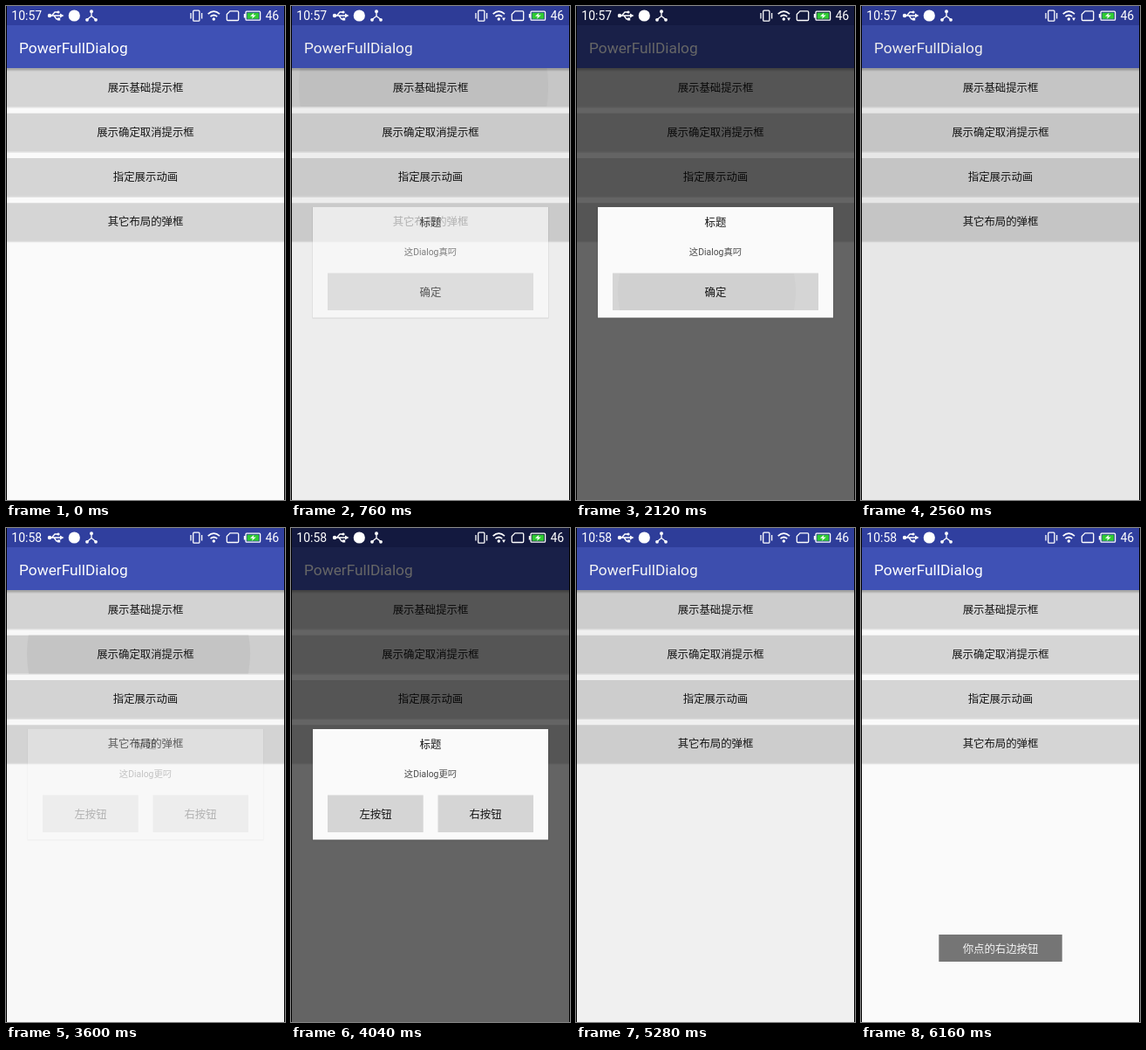
These frames come from a looping animation (320x565 px, 6880 ms). An HTML page:

```html
<!DOCTYPE html>
<html lang="zh-CN">
<head>
<meta charset="utf-8">
<title>PowerFullDialog</title>
<style>
html, body { margin: 0; width: 100%; height: 100%; overflow: hidden; background: #fafafa; }
body > svg { display: block; width: 100vw; height: 100vh; }
text { font: 12.4px Roboto, "Noto Sans CJK SC", "Noto Sans CJK", sans-serif; text-anchor: middle; fill: #161616; }
text.left { text-anchor: start; }
text.status { font-size: 14px; fill: #fff; }
text.title { font-size: 17.3px; fill: #fff; }
text.msg { font-size: 10.4px; fill: #4c4c4c; }
.btn { fill: #d5d5d5; }
.anim { animation: 6880ms linear infinite; --out: cubic-bezier(.333, .667, .667, 1); }
.dim { animation-name: dim; }
.one { animation-name: one; }
.two { animation-name: two; }
.press { animation-name: press; }
.ripple { animation-name: ripple; transform-box: fill-box; transform-origin: center; }
.first { animation-delay: -2920ms; }
.tap { animation-name: tap; }
.toast { animation-name: toast; }
.before { animation-name: before; }
.after { animation-name: after; }
.traffic { animation-name: traffic; }

@keyframes dim {
  0% { opacity: 0; }
  10.47% { opacity: 0; animation-timing-function: var(--out); }
  16.86%, 33.71% { opacity: .6; }
  33.72% { opacity: .5; animation-timing-function: var(--out); }
  40.1%, 52.2% { opacity: 0; }
  52.21% { opacity: 0; animation-timing-function: var(--out); }
  58.72%, 72.66% { opacity: .6; }
  72.67% { opacity: .51; animation-timing-function: var(--out); }
  78.8%, 100% { opacity: 0; }
}
@keyframes one {
  0% { opacity: 0; }
  9.88% { opacity: 0; animation-timing-function: var(--out); }
  12.79%, 33.71% { opacity: 1; }
  33.72% { opacity: .52; animation-timing-function: var(--out); }
  35.4%, 100% { opacity: 0; }
}
@keyframes two {
  0% { opacity: 0; }
  51.74% { opacity: 0; animation-timing-function: var(--out); }
  54.65%, 72.66% { opacity: 1; }
  72.67% { opacity: .52; animation-timing-function: var(--out); }
  74.3%, 100% { opacity: 0; }
}
@keyframes press {
  0%, 46.5% { opacity: 0; }
  48%, 52.4% { opacity: .025; }
  56.4%, 100% { opacity: 0; }
}
@keyframes ripple {
  0%, 46.5% { opacity: 0; transform: scale(.15); }
  48% { opacity: .05; transform: scale(.45); }
  52.4% { opacity: .05; transform: scale(1); }
  56.4%, 100% { opacity: 0; transform: scale(1.4); }
}
@keyframes tap {
  0%, 30.8% { opacity: 0; }
  30.81%, 100% { opacity: .025; }
}
@keyframes toast {
  0% { opacity: 0; }
  79.65% { opacity: 0; animation-timing-function: var(--out); }
  87.21%, 100% { opacity: 1; }
}
@keyframes before {
  0%, 46.5% { opacity: 1; }
  46.51%, 100% { opacity: 0; }
}
@keyframes after {
  0%, 46.5% { opacity: 0; }
  46.51%, 100% { opacity: 1; }
}
@keyframes traffic {
  0%, 10.4% { opacity: 0; }
  10.41%, 46.5% { opacity: 1; }
  46.51%, 56.9% { opacity: 0; }
  56.91%, 68.01% { opacity: 1; }
  68.02%, 100% { opacity: 0; }
}
</style>
</head>
<body>
<svg viewBox="0 0 320 565" preserveAspectRatio="none">
  <defs>
    <linearGradient id="shade" x2="0" y2="1">
      <stop stop-opacity=".32"/>
      <stop offset="1" stop-opacity="0"/>
    </linearGradient>
    <g id="row">
      <rect y="1" width="320" height="44" opacity=".1"/>
      <rect class="btn" width="320" height="43.5"/>
    </g>
    <g id="panel">
      <rect x="24.5" y="230" width="271" height="127.5" opacity=".15"/>
      <rect x="25" y="230" width="270" height="126.5" fill="#fafafa"/>
      <text x="160" y="252.2">标题</text>
    </g>
  </defs>

  <rect width="320" height="565" fill="#fafafa"/>
  <use href="#row" y="71.5"/>
  <use href="#row" y="122.7"/>
  <use href="#row" y="174"/>
  <use href="#row" y="225.3"/>
  <svg y="71.5" width="320" height="43.5">
    <rect class="anim press first" width="320" height="44"/>
    <circle class="anim ripple first" cx="152" cy="21" r="129"/>
  </svg>
  <svg y="122.7" width="320" height="43.5">
    <rect class="anim press" width="320" height="44"/>
    <circle class="anim ripple" cx="152" cy="21" r="129"/>
  </svg>
  <text x="160" y="97.7">展示基础提示框</text>
  <text x="160" y="148.9">展示确定取消提示框</text>
  <text x="160" y="200.2">指定展示动画</text>
  <text x="160" y="251.4">其它布局的弹框</text>

  <rect y="71" width="320" height="4" fill="url(#shade)"/>
  <rect width="320" height="71" fill="#3f51b5"/>
  <rect width="320" height="22" fill="#303f9f"/>
  <text class="left title" x="15" y="53.5">PowerFullDialog</text>

  <rect class="anim dim" width="320" height="565"/>
  <path d="M.5 0V565M319.5 0V565" stroke="#000"/>

  <g class="anim one">
    <use href="#panel"/>
    <text class="msg" x="160" y="285">这Dialog真叼</text>
    <rect class="btn" x="42" y="305.5" width="236" height="42.5"/>
    <svg x="42" y="305.5" width="236" height="42.5">
      <circle class="anim tap" cx="108" cy="21" r="102"/>
    </svg>
    <text x="160" y="331.5">确定</text>
  </g>
  <g class="anim two">
    <use href="#panel"/>
    <text class="msg" x="160" y="285">这Dialog更叼</text>
    <rect class="btn" x="42" y="305.5" width="109.7" height="42.5"/>
    <rect class="btn" x="168.5" y="305.5" width="109.5" height="42.5"/>
    <text x="97" y="331.5">左按钮</text>
    <text x="223" y="331.5">右按钮</text>
  </g>

  <g class="anim toast">
    <rect x="89.3" y="465" width="141.4" height="31" fill="#757575"/>
    <text x="160" y="485.6" style="fill:#f4f4f4">你点的右边按钮</text>
  </g>

  <text class="left status anim before" x="6.3" y="16.3">10:57</text>
  <text class="left status anim after" x="6.3" y="16.3">10:58</text>
  <text class="left status" x="297.5" y="16.3">46</text>
  <g fill="#fff">
    <circle cx="50" cy="11" r="2.2"/>
    <path d="M62 8.5L66.5 11L62 13.5z"/>
    <circle cx="60" cy="7" r="1.6"/>
    <rect x="59" y="13.5" width="3.2" height="3"/>
    <circle cx="78.3" cy="11" r="6.6"/>
    <circle cx="98" cy="6.3" r="2"/>
    <circle cx="93" cy="15.8" r="1.9"/>
    <circle cx="103" cy="15.8" r="1.9"/>
    <circle cx="238.3" cy="15" r="1.7"/>
    <path class="anim traffic" d="M242 13.5h4l-2 3.5z"/>
    <rect x="272.8" y="9" width="2" height="4.5"/>
  </g>
  <g fill="none" stroke="#fff" stroke-width="1.3">
    <path d="M50 11H63M52.5 11L56 7H60M55 11L58 15H60"/>
    <path d="M98 7V11.5L93 15.5M98 11.5L103 15.5"/>
    <rect x="214.7" y="5.2" width="7.2" height="12" rx="1"/>
    <path d="M212 8V14.5M224.6 8V14.5"/>
    <path d="M231.7 9.2Q238.3 3.2 245 9.2M234.5 12.2Q238.3 8.8 242.2 12.2" stroke-width="1.7"/>
    <path d="M257 5.8H265.5Q266.7 5.8 266.7 7V15.3Q266.7 16.5 265.5 16.5H254.5Q253.3 16.5 253.3 15.3V9.5z"/>
    <rect x="275" y="6.2" width="16.6" height="10" rx="1"/>
  </g>
  <rect x="276.5" y="7.7" width="13.6" height="7" fill="#2fcb32"/>
  <path d="M284.5 7.7L280 11.8H283L282 14.7L286.7 10.5H283.6z" fill="#fff"/>
</svg>
</body>
</html>
```
